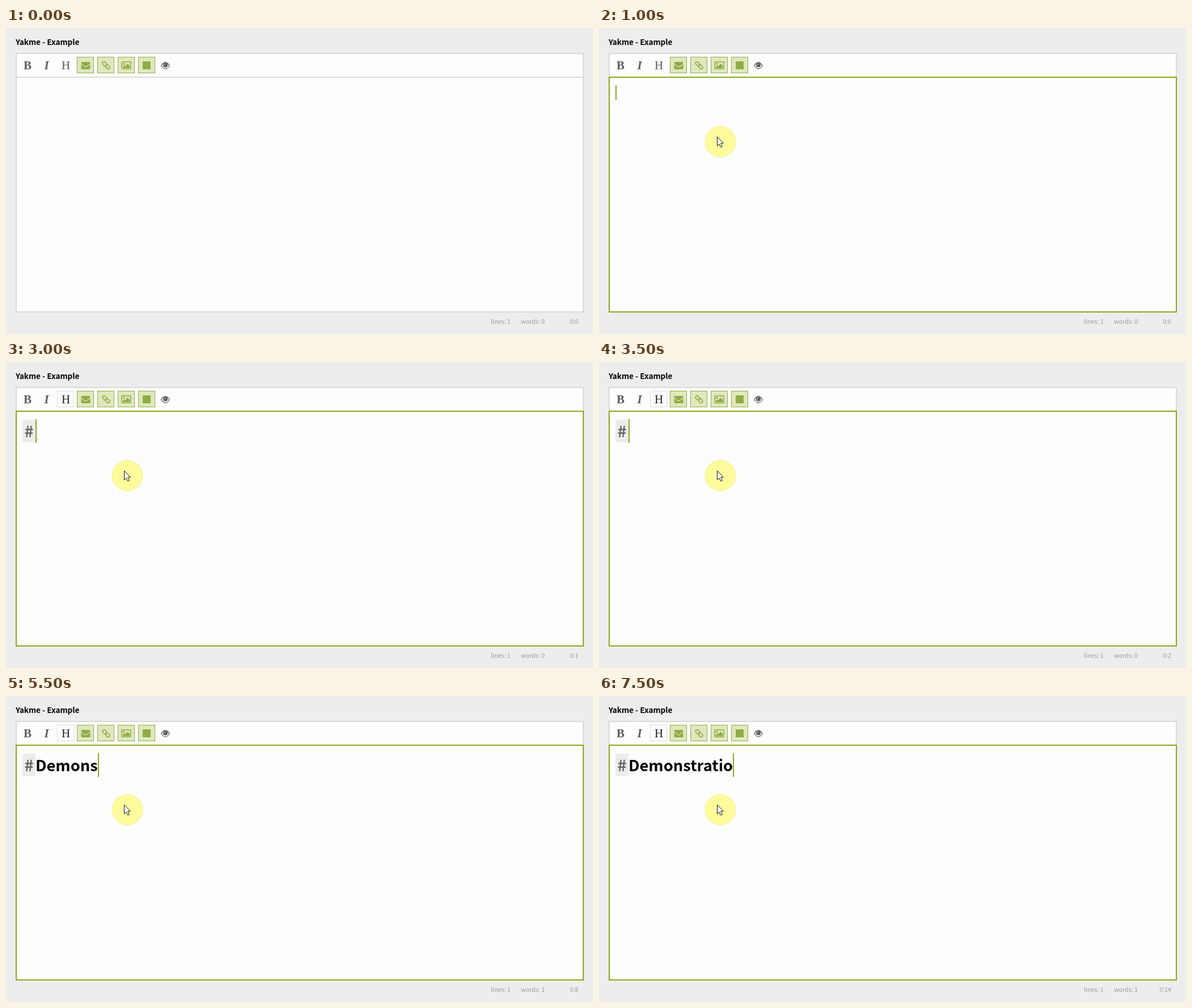
An HTML page that plays this animation: 1035x541 px, repeating every 8 s.

```html
<!DOCTYPE html>
<html lang="en">
<head>
<meta charset="utf-8">
<title>Editor demo</title>
<style>
  html, body { margin: 0; width: 100%; height: 100%; overflow: hidden; background: #ededed; }
  svg { display: block; width: 1035px; height: 541px; }
  text { font-family: "Noto Sans CJK JP", "Noto Sans CJK SC", "Noto Sans CJK", "Open Sans", sans-serif; white-space: pre; }
  .bold { font-weight: 600; }
  .tool { font: 21px "Liberation Serif", serif; fill: #5c5c5c; text-anchor: middle; }
  .status { font-size: 10.7px; fill: #999; }
  .button { fill: #dfe8bd; stroke: #8fac45; }
  .icon { fill: #8fac45; }
  .line { fill: none; stroke: #8fac45; stroke-width: 1.6; }
</style>
</head>
<body>
<svg viewBox="0 0 1035 541">
  <text class="bold" x="17" y="30" font-size="13.6">Yakme - Example</text>
  <rect x="18" y="45" width="1000" height="457" fill="#fdfdfd" stroke="#dadada" stroke-width="2"/>
  <rect id="editor" x="18" y="87" width="1000" height="415" fill="#fdfdfd" stroke-width="2"/>

  <rect id="headingButton" x="90.5" y="51.5" width="29" height="28" fill="#fcfcfc" stroke="#ddd"/>
  <text class="tool" x="38" y="73" style="font-weight:bold">B</text>
  <text class="tool" x="71.5" y="73" style="font-weight:bold;font-style:italic">I</text>
  <text class="tool" id="headingLetter" x="105.5" y="73">H</text>

  <g class="button">
    <rect x="125.5" y="51.5" width="29" height="28"/>
    <rect x="161.5" y="51.5" width="29" height="28"/>
    <rect x="197.5" y="51.5" width="29" height="28"/>
    <rect x="233.5" y="51.5" width="29" height="28"/>
  </g>
  <path class="icon" d="M132.5 61.5Q132.5 60 134 60H147Q148.500 60 148.500 61.500Q148.500 63 146.500 64.500L141.800 67.700Q140.500 68.500 139.200 67.700L134.500 64.500Q132.500 63 132.500 61.500Z
    M132.500 64.500L138.500 68.700Q140.500 70 142.500 68.700L148.500 64.500V71.500Q148.500 73 147 73H134Q132.500 73 132.500 71.500Z"/>
  <g class="line" transform="rotate(45 176.500 66)">
    <rect x="168.800" y="63.300" width="8.200" height="5.400" rx="2.500"/>
    <rect x="176" y="63.300" width="8.200" height="5.400" rx="2.500"/>
  </g>
  <rect class="line" x="204.200" y="59.700" width="15.800" height="12.600" rx="1.200" stroke-width="1.300"/>
  <circle class="icon" cx="208" cy="63.500" r="1.700"/>
  <path class="icon" d="M206 70.800V68.800L208.800 66.200L210.200 67.500L214.500 63L218.300 67V70.800Z"/>
  <rect class="icon" x="241" y="59" width="14" height="14"/>

  <path d="M273.700 66.500Q281 55.500 288.300 66.500Q281 77.500 273.700 66.500Z" fill="none" stroke="#5c5c5c" stroke-width="1.300"/>
  <circle cx="281" cy="65.500" r="4" fill="#5c5c5c"/>
  <path d="M278.800 65.500Q278.900 63.400 281 63.300" fill="none" stroke="#fdfdfd" stroke-width=".9"/>

  <g id="heading">
    <rect x="29" y="102" width="23" height="40" fill="#ececec"/>
    <text class="bold" x="40.500" y="133" font-size="27.300" fill="#666" text-anchor="middle">#</text>
    <text class="bold" id="typed" x="52" y="133" font-size="27.300"></text>
  </g>
  <rect id="caret" y="101" width="2" fill="#8aa81f"/>

  <g id="pointer">
    <circle cx="214" cy="201" r="27.300" fill="#fdfb9b" stroke="#efedb4" stroke-width=".8"/>
    <path d="M208.500 192.500V208.500L212 205L214.600 210.700L217.300 209.500L214.700 203.700H219.300Z" fill="#fff" stroke="#111"/>
  </g>

  <text class="status" x="855" y="523">lines: 1</text>
  <text class="status" id="words" x="908" y="523"></text>
  <text class="status" id="position" x="1009" y="523" text-anchor="end"></text>
</svg>
<script>
const STEP = 500, STEPS = 16, FIRST_KEY = 6;
const TITLE = "# Demonstratio";
// Characters present after each step once typing has begun
const COUNTS = [1, 2, 3, 4, 6, 8, 9, 10, 12, 14];

const $ = id => document.getElementById(id);
const show = (id, on) => $(id).setAttribute("visibility", on ? "visible" : "hidden");

function draw(step) {
  const focused = step >= 2;
  const count = step < FIRST_KEY ? 0 : COUNTS[step - FIRST_KEY];
  const typed = TITLE.slice(2, Math.max(2, count));

  show("pointer", step >= 1);
  show("heading", count > 0);
  show("headingButton", count > 0);
  show("caret", focused && (count > 0 || step % 2 === 0));
  $("headingLetter").style.fill = count ? "#222" : "";
  $("editor").setAttribute("stroke", focused ? "#88a81c" : "#dadada");

  $("typed").textContent = typed;
  const end = typed ? Math.round(52 + $("typed").getComputedTextLength()) : 52;
  $("caret").setAttribute("x", count ? end : 29);
  $("caret").setAttribute("height", count ? 42 : 26);

  $("words").textContent = "words: " + (typed ? 1 : 0);
  $("position").textContent = "0:" + count;
}

const start = performance.now();
let last = -1;
function tick() {
  const step = Math.floor((performance.now() - start) / STEP) % STEPS;
  if (step !== last) draw(last = step);
  requestAnimationFrame(tick);
}
tick();
</script>
</body>
</html>
```
